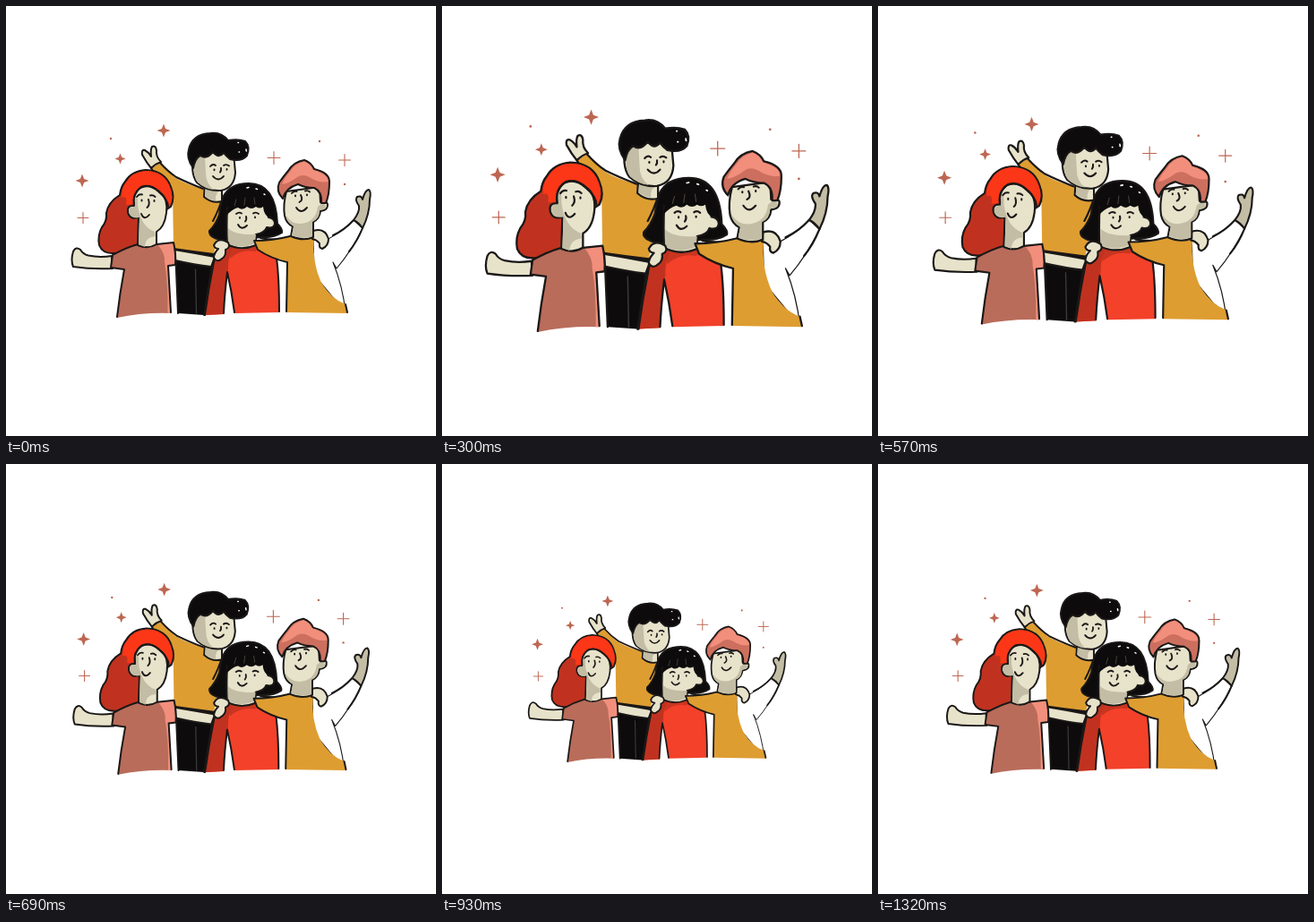
An HTML page for the animation above (1.35 s loop, 480x480 px).

```html
<!DOCTYPE html>
<html lang="en">
<head>
<meta charset="utf-8">
<title>Waving friends</title>
<style>
  html, body { margin: 0; width: 100%; height: 100%; overflow: hidden; background: #fff; }
  svg { display: block; width: 100vw; height: 100vh; }
  path { fill: none; stroke-linecap: round; stroke-linejoin: round; }
  .o { stroke: #1a1817; stroke-width: 2; }
  .thin { stroke: #1a1817; stroke-width: 1.1; }
  .face { stroke: #1a1817; stroke-width: 1.9; }
  .skin { fill: #e7e2ca; }
  .shade { fill: #c3bda5; }
  .black { fill: #0d0b0b; }
  .gold { fill: #de9d31; }
  .red { fill: #f3412a; }
  .dark { fill: #c0321f; }
  .hair { fill: #fb3717; }
  .rose { fill: #b96c5a; }
  .pink { fill: #f28f7c; }
  .salmon { fill: #cd6f5e; }
  .white { fill: #fff; }
  .fleck { stroke: #fff; stroke-width: 1.5; }
  .star { fill: #bd6753; }
  .plus { stroke: #bd6753; stroke-width: 1.1; }
</style>
</head>
<body>
<svg viewBox="0 0 480 480">
  <g id="group">
    <g id="stars"></g>

    <!-- boy at the back -->
    <g>
      <path class="o black" d="M192 343 L189 272 L232 276 L221 345"/>
      <path d="M211.500 294 L212.500 343" stroke="#3a3a3e" stroke-width="1.300"/>
      <path class="gold" d="M162 181 Q170 195 186 205 L187 271 Q208 274 232 277 L244 218 Q240 206 222 205 Q198 198 188 191 Q180 184 172 175 Z"/>
      <path class="o" d="M172 175 Q181 185 190 191 Q202 197 220 204 M162 181 Q170 195 184 204 M187 271 Q208 274 232 277 M242 213 Q237 229 231 240"/>
      <path class="o skin" d="M162 181 Q157 175 152 166 Q151 160 155 161 Q159 163 162 168 Q161 160 163 157 Q167 155 168 161 Q167 168 173 174 Q167 176 162 181 Z"/>
      <path class="o skin" d="M222 197 L221 213 Q230 221 241 218 L241 203 Z"/>
      <path class="shade" d="M223 199 L222 212 Q228 217 234 217 Q233 208 241 204 Z"/>
      <path class="o skin" d="M210 164 Q205 186 213 197 Q224 207 240 206 Q255 203 256 186 L254 164 Z"/>
      <path class="shade" d="M210 178 Q209 191 214 197 Q222 204 232 205 Q223 199 223 186 L222 168 L211 168 Z"/>
      <path class="o black" d="M209 181 Q201 170 204 160 Q208 143 228 142 Q240 140 248 150 Q259 148 267 151 Q273 157 269 167 Q263 174 250 171 Q246 168 243 164 Q237 171 231 163 Q224 172 217 167 Q211 170 209 181 Z"/>
      <path class="fleck" d="M259 152.500 h.5 M268 160 l.3 2 M260 163 h.5"/>
      <path class="face" d="M228 179 q3 -3.500 6 -1 M243 178 q3 -2 6 .500 M232.500 182.500 v.800 M246.500 182 v.800 M240 181 q.500 3 -1 4.500 M231 190 Q237 197 243 190"/>
    </g>

    <!-- red-haired girl -->
    <g>
      <path class="o dark" d="M156 183 Q140 184 133 196 Q128 202 127 211 Q114 219 112 231 Q113 240 107 247 Q102 256 104 267 Q108 277 121 276 Q134 276 147 267 L160 240 L184 224 Q189 214 184 202 Q178 184 156 183 Z"/>
      <path class="hair" d="M156 184 Q141 185 134 197 Q129 203 129 214 Q136 211 134 222 L145 221 Q140 209 151 202 Q160 197 172 208 Q180 216 182 224 Q188 214 183 202 Q176 184 156 184 Z"/>
      <path class="o skin" d="M118 279 Q104 281 92 278.500 Q86 277 83 272 Q78 268 75 274 Q72 284 75 291 Q95 294 119 293 Z"/>
      <path class="o skin" d="M188 272 Q212 276 233 280 L229 291 Q211 289 189 284 Z"/>
      <path class="rose" d="M124 348 Q127 321 132 294 L117 292 L119 278 Q133 270 147 266 Q158 271 168 266 L187 264 L189 289 L181 290 L184 343 Q152 342 124 348 Z"/>
      <path class="pink" d="M169 266 L187 264 L189 289 L181 290 L184 343 L180.500 343 Q181 309 177 286 Q178 276 169 266 Z"/>
      <path class="o" d="M124 347 Q127 321 132 294 L117 292 L119 278 Q133 270 147 266 M168 266 L187 264 Q190 277 189 289 L181 290 L184 342"/>
      <path class="o skin" d="M148 236 Q138 239 136 230 Q135 222 143 223 Q141 209 151 202 Q162 198 172 208 Q181 215 179 231 Q177 247 168 252 L168 266 Q158 272 147 267 Z"/>
      <path class="shade" d="M149 236 Q139 238 137 230 Q137 223 144 224 L143 213 Q148 210 147 222 Q150 246 166 252 L167 257 Q155 258 155 269 L148 266 Z"/>
      <path class="hair" d="M144 213 Q145 202 153 198 Q168 199 181 216 L182 203 Q172 189 153 190 Q138 200 144 213 Z"/>
      <path class="o" d="M143 222 Q141 209 150 203 Q160 198 170 207 Q181 216 181 224"/>
      <path class="face" d="M146 213 q2.500 -3.500 6 -2.500 M161 211.500 q3 -1 5.500 1.500 M151.500 216.500 v1 M165.500 217 v1 M159 216 Q161 222 157.500 225 M151 232 Q154 240 160 233"/>
    </g>

    <!-- right boy: torso, arm and raised hand -->
    <g>
      <path class="thin white" d="M379 342 Q376 313 365 286 L369 293 Q386 273 398 248 L388 239 Q377 251 358 261 L343 258 L344 300 Z"/>
      <path class="o" d="M398 248 Q392 263 383 274 M388 239 Q378 250 365 256" stroke-width="1.500"/>
      <path class="o shade" d="M388 239 Q395 230 394 223 Q389 216 392 213 Q397 211 398 216 Q401 205 405 205 Q408 207 406 216 Q406 232 398 248 Q394 242 388 239 Z"/>
    </g>

    <!-- girl in red -->
    <g>
      <path class="o red" d="M284 259 Q310 264 343 253 L346 260 L316 266 Z"/>
      <path class="red" d="M244 263 Q235 274 232 286 Q226 316 222 345 L243 344 Q244 322 247 297 Q252 319 255 343 L305 342 Q305 304 302 281 L286 264 Z"/>
      <path class="dark" d="M244 263 Q235 274 232 286 Q226 316 222 345 L243 344 Q244 318 248 293 Q248 278 253 270 Z"/>
      <path class="dark" d="M247 265 L280 266 Q283 271 278 274 Q262 271 250 282 Z" opacity=".8"/>
      <path class="o" d="M244 263 Q235 274 232 286 Q226 316 222 345 M243 343 Q244 322 247 297 Q252 319 255 342 M302 281 Q305 304 305 341"/>
      <path class="o black" d="M271 198 Q249 198 242 214 Q239 223 238 233 Q234 244 227 251 Q226 256 233 259 Q241 263 249 262 L285 258 Q299 259 308 253 Q309 249 303 243 Q302 220 294 209 Q286 198 271 198 Z"/>
      <path class="o skin" d="M247 225 Q246 247 247 266 Q262 274 279 267 L279 255 Q289 253 291 247 Q299 249 300 243 Q300 237 293 236 L290 221 Z"/>
      <path class="shade" d="M248 248 Q255 256 279 255 L278 265 Q262 272 248 265 Z"/>
      <path class="black" d="M246 234 L249 217 L291 217 L294 236 Q288 234 287 224 Q283 227 279 224 Q274 228 269 224 Q264 229 259 225 Q252 227 246 234 Z"/>
      <path d="M255 223 l2 -7 M266 222 l1 -8 M278 221 l-1 -7" stroke="#55504a" stroke-width=".8"/>
      <path class="fleck" d="M269 203 l2 -.5 M279 204 l1.500 .5 M288 210 l1 .5"/>
      <path class="face" d="M257 232 q3 -2.500 6 -.5 M276 231.500 q3 -2 6 .5 M261 236 v.8 M278 235.500 v.8 M268 235 q1 3 -1 5.500 M259 244 Q263 251 269 245"/>
    </g>

    <!-- right boy: shirt front, head -->
    <g>
      <path class="gold" d="M277 262 Q298 262 317 257 Q330 262 344 258 Q341 285 352 309 Q363 327 379 333 L381 343 L313 342 L314 285 Q295 281 281 272 Z"/>
      <path class="o" d="M277 262 Q298 262 317 257 M281 272 Q296 282 314 286 L313 341 M277 262 L281 272"/>
      <path class="o" d="M379 333 L381 342"/>
      <path class="o skin" d="M343 251 Q356 247 360 260 Q360 268 353 271 Q349 270 350 265 Q347 261 342 260 Z"/>
      <path class="o skin" d="M313 207 Q309 222 311 234 Q313 243 320 246 L318 257 Q332 263 343 258 L343 241 Q350 238 351 229 Q360 228 359 221 Q357 216 351 219 L350 202 Z"/>
      <path class="shade" d="M312 233 Q314 242 321 246 L319 256 Q331 261 342 257 L342 241 Q350 238 350 228 L357 226 Q358 221 353 220 L348 224 Q346 242 328 243 Q318 243 312 233 Z"/>
      <path class="o salmon" d="M309 215 Q301 207 305 197 Q310 190 315 184 Q321 174 333 172 Q341 175 344 182 Q361 186 361 196 Q361 211 357 220 L352 220 Q353 207 344 203 Q334 203 326 199 Q312 203 309 215 Z"/>
      <path class="pink" d="M308 199 Q312 190 317 185 Q322 176 333 173.500 Q340 176 343 183 Q360 188 359.500 196 Q352 198 342 193 Q332 186 325 191 Q316 198 308 199 Z"/>
      <path class="face" d="M319 209 q2.500 -3 5.500 -2 M334 206.500 q3 -1 5 1 M323 211.500 v.8 M336 210.500 v.8 M329 211 Q332 217 327.500 219 M324 225 Q329 233 336 225"/>
    </g>

    <!-- hand on the red shoulder -->
    <path class="o skin" d="M244 262 Q236 259 232 267 Q233 271 237 271 Q232 276 232 281 Q236 287 241 282 Q246 279 245 272 Q251 270 248 264 Z"/>
  </g>
</svg>
<script>
  const LOOP = 1350, STEP = 30, SWING = 0.15, MID = 240;
  const group = document.getElementById('group');

  const spark = (x, y, r) => {
    const k = r * 0.28;
    return `<path class="star" d="M${x} ${y - r} L${x + k} ${y - k} L${x + r} ${y} L${x + k} ${y + k} L${x} ${y + r} L${x - k} ${y + k} L${x - r} ${y} L${x - k} ${y - k} Z"/>`;
  };
  const plus = (x, y, r) =>
    `<path class="plus" d="M${x - r} ${y} h${2 * r} M${x} ${y - r} v${2 * r}"/>`;
  const dot = (x, y) => `<circle class="star" cx="${x}" cy="${y}" r="1.2"/>`;

  document.getElementById('stars').innerHTML =
    spark(85, 195, 7.5) + spark(176, 139, 7.5) + spark(127.5, 170.5, 6) +
    plus(86, 236.5, 6) + plus(299, 169.5, 7) + plus(378, 172, 6.5) +
    dot(117, 148) + dot(350, 151) + dot(378, 199);

  function draw(now) {
    const t = Math.floor((now % LOOP) / STEP) * STEP;
    const s = 1 + SWING * Math.sin(2 * Math.PI * t / LOOP);
    group.setAttribute('transform', `translate(${MID} ${MID}) scale(${s}) translate(${-MID} ${-MID})`);
  }

  const start = performance.now();
  function tick() {
    draw(performance.now() - start);
    requestAnimationFrame(tick);
  }
  tick();
</script>
</body>
</html>
```
